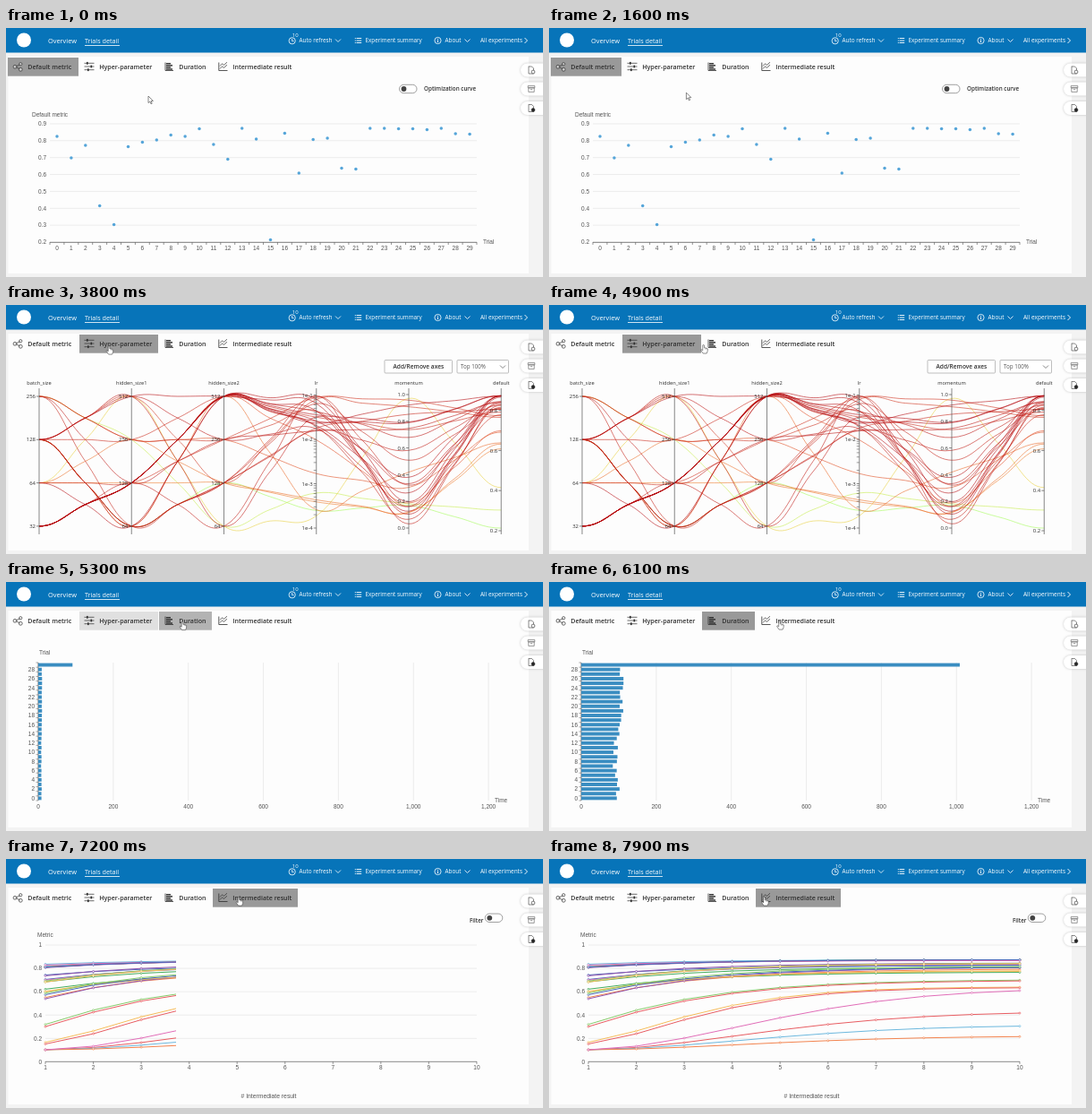
An HTML page with a canvas that plays this animation: 600x278 px, repeating every 8 s.

```html
<!DOCTYPE html>
<html lang="en">
<head>
<meta charset="utf-8">
<title>Trials detail</title>
<style>
html, body { margin: 0; width: 100%; height: 100%; overflow: hidden; background: #f3f3f3; }
canvas { display: block; width: 600px; height: 278px; }
</style>
</head>
<body>
<canvas id="stage"></canvas>
<script>
const LOOP = 8000, W = 600, H = 278;
const canvas = document.getElementById('stage');
const c = canvas.getContext('2d');
const ratio = window.devicePixelRatio || 1;
canvas.width = W * ratio;
canvas.height = H * ratio;

const UI = '"Open Sans", "Noto Sans", sans-serif';
const PLOT = '"Liberation Sans", Arial, sans-serif';
const INK = '#2f2f2f', AXIS = '#6b6b6b', GRID = '#e7e7e7';
const range = n => Array.from({ length: n }, (_, i) => i);
const clamp = v => Math.max(0, Math.min(1, v));
const mix = (a, b, p) => a + (b - a) * p;
const rand = (i, salt) => {
  const v = Math.sin(i * 12.9898 + salt * 78.233) * 43758.5453;
  return v - Math.floor(v);
};

// ---- drawing helpers ----
function text(s, x, y, size, { color = INK, align = 'left', weight = 400, font = UI } = {}) {
  c.font = `${weight} ${size}px ${font}`;
  c.fillStyle = color;
  c.textAlign = align;
  c.fillText(s, x, y + size * 0.36);
}
const label = (s, x, y, align = 'center', size = 6.5) =>
  text(s, x, y, size, { color: '#555', align, font: PLOT });

function path(points, color, width = 1, fill) {
  c.beginPath();
  points.forEach(([x, y], i) => i ? c.lineTo(x, y) : c.moveTo(x, y));
  if (fill) { c.closePath(); c.fillStyle = fill; c.fill(); }
  c.strokeStyle = color;
  c.lineWidth = width;
  c.stroke();
}
const line = (x1, y1, x2, y2, color, width = 1) => path([[x1, y1], [x2, y2]], color, width);

function rect(x, y, w, h, color) {
  c.fillStyle = color;
  c.fillRect(x, y, w, h);
}
function paint(fill, stroke, width) {
  if (fill) { c.fillStyle = fill; c.fill(); }
  if (stroke) { c.strokeStyle = stroke; c.lineWidth = width; c.stroke(); }
}
function circle(x, y, r, fill, stroke, width = 0.8) {
  c.beginPath();
  c.arc(x, y, r, 0, Math.PI * 2);
  paint(fill, stroke, width);
}
function box(x, y, w, h, r, fill, stroke, width = 0.8) {
  c.beginPath();
  c.roundRect(x, y, w, h, r);
  paint(fill, stroke, width);
}
const chevron = (x, y, color) => path([[x - 3, y - 1.5], [x, y + 1.5], [x + 3, y - 1.5]], color, 0.8);

function toggle(x, y) {
  box(x, y - 4.7, 19.5, 9.4, 4.7, '#fff', '#777', 0.7);
  circle(x + 5, y, 2.9, '#444');
}

// ---- page frame ----
function header() {
  const white = { color: '#fff' };
  rect(0, 0, W, 27.5, '#0774b9');
  circle(20, 13.5, 8, '#fff');
  text('Overview', 47, 14.5, 7.4, white);
  text('Trials detail', 88, 14.5, 7.2, white);
  line(88, 19.5, 127, 19.5, '#fff', 0.8);

  circle(319.7, 14.3, 3.6, null, '#fff');
  path([[319.7, 12], [319.7, 14.6], [321.6, 14.6]], '#fff', 0.8);
  text('10', 319.8, 7.6, 6, white);
  text('Auto refresh', 327.5, 14, 6.4, white);
  chevron(371, 14, '#fff');

  for (const y of [11.5, 14, 16.5]) {
    rect(389.8, y - 0.4, 1, 0.9, '#fff');
    rect(391.6, y - 0.4, 5.6, 0.9, '#fff');
  }
  text('Experiment summary', 401.5, 14, 6.3, white);

  circle(482.5, 14, 3.6, null, '#fff');
  rect(482.1, 13.4, 0.9, 2.7, '#fff');
  rect(482.1, 11.8, 0.9, 0.9, '#fff');
  text('About', 490.5, 14, 6.4, white);
  chevron(515.5, 14, '#fff');
  text('All experiments', 530, 14, 6.5, white);
  path([[579.5, 11], [582.5, 14], [579.5, 17]], '#fff', 0.9);
}

function sideButtons() {
  [47, 68, 89.5].forEach((y, i) => {
    c.save();
    c.shadowColor = 'rgba(0,0,0,.22)';
    c.shadowBlur = 3 * ratio;
    box(575, y - 7.5, 32, 15, 7.5, '#fff');
    c.restore();
    if (i === 1) {
      box(583.2, y - 3.4, 7.6, 2.2, 0, null, '#555', 0.6);
      box(583.8, y - 1.2, 6.4, 4.6, 0, null, '#555', 0.6);
      line(585.8, y + 0.7, 588.2, y + 0.7, '#555', 0.6);
    } else {
      path([[584, y - 4], [587.5, y - 4], [589.5, y - 2], [589.5, y + 4], [584, y + 4], [584, y - 4.3]], '#555', 0.7);
      circle(589, y + 2, 1.9, i ? '#222' : '#fff', '#444', 0.7);
    }
  });
}

// ---- tabs: each fades in when pressed and out at the next press ----
const icons = [
  () => {
    path([[16, 40.5], [10.5, 43.3], [16, 46.2]], INK, 0.7);
    circle(10, 43.3, 1.9, '#fff8', INK, 0.7);
    circle(16.3, 40.2, 1.6, '#fff8', INK, 0.7);
    circle(16.3, 46.3, 1.9, '#fff8', INK, 0.7);
  },
  () => range(3).forEach(i => {
    const y = 39.3 + i * 3.7;
    line(87.5, y, 98.5, y, INK, 0.7);
    rect([90, 94.5, 91][i], y - 1.4, 1.6, 2.8, INK);
  }),
  () => {
    path([[178, 38.5], [178, 47.5], [187, 47.5]], INK, 0.8);
    range(4).forEach(i => rect(179, 39 + i * 2.1, 5 + (i % 2) * 2, 1.4, INK));
  },
  () => {
    path([[237.8, 38.5], [237.8, 47.5], [247.5, 47.5]], INK, 0.8);
    for (const y of [0, 3]) path([[239, 42.5 + y], [241.5, 39.8 + y], [243.5, 41.4 + y], [247, 38.2 + y]], INK, 0.7);
  }
];
const tabs = [
  { name: 'Default metric', x: 2, w: 79, on: -1000, hover: -1000 },
  { name: 'Hyper-parameter', x: 82, w: 88, on: 3460, hover: 2150 },
  { name: 'Duration', x: 171, w: 59, on: 5230, hover: 4950 },
  { name: 'Intermediate result', x: 231, w: 95, on: 6860, hover: 6110 }
];

function tabBar(t) {
  tabs.forEach((tab, i) => {
    const next = tabs[i + 1] ? tabs[i + 1].on : LOOP;
    const on = clamp((t - tab.on) / 100), off = clamp((t - next) / 100);
    const idle = t > tab.hover ? 241 : 253;
    const g = Math.round(off ? mix(153, 253, off) : mix(idle, 153, on));
    if (g < 253) rect(tab.x, 33, tab.w, 20.7, `rgb(${g},${g},${g})`);
    icons[i]();
    text(tab.name, tab.x + 22.3, 43.3, 7.05, { weight: 600 });
  });
}

// ---- trials: final score of each run, in thousandths ----
const score = [826, 698, 773, 415, 303, 765, 791, 805, 834, 826, 871, 778, 691, 873, 810,
  213, 844, 608, 807, 815, 638, 632, 873, 873, 871, 871, 866, 873, 842, 839].map(v => v / 1000);
const trials = range(score.length);

function defaultMetric() {
  text('Optimization curve', 467, 68, 6.3, { weight: 600 });
  toggle(439.5, 68);
  label('Default metric', 29, 97, 'left');
  range(8).forEach(i => {
    const y = 239 - i * 18.86;
    if (i) line(49, y, 526, y, GRID, 0.8);
    label((0.2 + i / 10).toFixed(1), 45, y, 'right');
  });
  line(49, 239.3, 526, 239.3, AXIS, 0.9);
  range(31).forEach(i => line(49 + i * 15.9, 239, 49 + i * 15.9, 242, AXIS, 0.7));
  trials.forEach(i => {
    const x = 57 + i * 15.9;
    label(i, x, 245.8);
    circle(x, 239 - (score[i] - 0.2) * 188.6, 1.75, '#55a5d9');
  });
  label('Trial', 533, 239, 'left');
}

// ---- parallel axes: good runs share settings and high learning rates ----
const axisX = i => 37 + i * 103.25;
const parallel = trials.map(i => {
  const v = score[i], weak = clamp((0.76 - v) / 0.14);
  const shared = v > 0.84 && rand(i, 1) < 0.65;
  const level = k => shared ? [0, 1, 3][k] : Math.floor(4 * rand(i, k + 2));
  return [
    ...range(3).map(k => 246.9 - 48.3 * level(k)),
    101 + 40 * rand(i, 5) ** 1.3 + weak * 104,
    101 + 147 * rand(i, 6),
    252 - (v - 0.2) * 224
  ];
});
const byScore = [...trials].sort((a, b) => score[a] - score[b]);
const ramp = [[164, 252, 90], [228, 225, 70], [250, 160, 55], [222, 70, 35], [182, 14, 20]];

function heat(v) {
  const p = clamp((v - 0.21) / 0.665) * 3.999, i = Math.floor(p);
  return `rgba(${ramp[i].map((a, k) => Math.round(mix(a, ramp[i + 1][k], p - i)))},.74)`;
}

// Passes through every axis and every halfway point, bending only near the axes.
function smooth(ys, color) {
  const pts = range(11).map(i => [axisX(i / 2), (ys[Math.floor(i / 2)] + ys[Math.ceil(i / 2)]) / 2]);
  const slope = i => i % 10 ? (pts[i + 1][1] - pts[i - 1][1]) * 0.2 : 0;
  c.beginPath();
  c.moveTo(...pts[0]);
  range(10).forEach(i => {
    const [x, y] = pts[i], [nx, ny] = pts[i + 1];
    c.bezierCurveTo(x + 20.6, y + slope(i), nx - 20.6, ny - slope(i + 1), nx, ny);
  });
  c.strokeStyle = color;
  c.lineWidth = 0.8;
  c.stroke();
}

const powers = (top, n) => range(n).map(i => top / 2 ** i);
const axes = [
  { name: 'batch_size', marks: powers(256, 4), top: 102, step: 48.3 },
  { name: 'hidden_size1', marks: powers(512, 4), top: 102, step: 48.3 },
  { name: 'hidden_size2', marks: powers(512, 4), top: 102, step: 48.3 },
  { name: 'lr', marks: range(4).map(i => `1e-${i + 1}`), top: 100.5, step: 49.5 },
  { name: 'momentum', marks: range(6).map(i => (1 - i / 5).toFixed(1)), top: 100, step: 29.8 },
  { name: 'default', marks: range(4).map(i => (0.8 - i / 5).toFixed(1)), top: 117.6, step: 44.8 }
];

function hyperParameter() {
  box(423, 61.5, 75.5, 14.5, 1, '#fff', '#a3a3a3', 0.7);
  text('Add/Remove axes', 460.8, 68.8, 6.6, { weight: 600, align: 'center' });
  box(504, 61.5, 57.5, 14.5, 1, '#fff', '#a3a3a3', 0.7);
  text('Top 100%', 508, 68.8, 6.2, { color: '#555' });
  chevron(555, 69, '#666');

  byScore.forEach(i => smooth(parallel[i], heat(score[i])));
  axes.forEach(({ name, marks, top, step }, i) => {
    const x = axisX(i);
    line(x, 93, x, 256, '#555', 0.7);
    text(name, x, 87.3, 5.7, { align: 'center' });
    marks.forEach((s, k) => {
      const y = top + k * step;
      line(x - 3, y, x, y, '#555', 0.7);
      text(s, x - 4, y, 6, { align: 'right' });
      if (name === 'lr' && k < 3) range(8).forEach(n => {
        const my = y - step * Math.log10((n + 2) / 10);
        line(x - 3, my, x, my, '#555', 0.6);
      });
    });
  });
}

// ---- duration bars ----
const barLength = i => i === 29 ? 425 : 42 + 4 * Math.sin((i - 16) / 5) + 6 * (rand(i, 7) - 0.5);

function duration(t) {
  const grow = 1 - (1 - clamp((t - 5270) / 1000)) ** 3;
  label('Trial', 37, 79, 'left');
  range(7).forEach(i => {
    const x = 36 + i * 83.85;
    if (i) line(x, 90, x, 244, GRID, 0.8);
    label((i * 200).toLocaleString('en-US'), x, 250.7);
  });
  line(36, 90, 36, 244, AXIS, 0.9);
  range(31).forEach(i => line(33.5, 244 - i * 5.133, 36, 244 - i * 5.133, AXIS, 0.6));
  trials.forEach(i => {
    const y = 241.4 - i * 5.133;
    if (i % 2 === 0) label(i, 32, y, 'right');
    rect(36, y - 1.95, barLength(i) * grow, 3.9, '#3a8dc1');
  });
  label('Time', 546, 244, 'left');
}

// ---- intermediate results: weak runs start low and learn late ----
const palette = ['#4a67bb', '#86cb6b', '#f6bd5b', '#e85d62', '#6cb8de', '#45ad5d', '#f3844f', '#9357ae', '#e16db8'];
const stepX = i => 44 + i * 53.55;

const curves = trials.map(n => {
  const v = score[n], end = 226 - 130 * v;
  const weak = clamp((0.89 - v) / 0.28), late = weak ** 6;
  const spread = v > 0.75 ? 0.4 + 1.2 * rand(n, 8) : 1;
  const gap = (213 - end) * weak ** 1.2 * spread + (v > 0.75 ? 3 : 0);
  const learn = i => 1 - Math.exp(-mix(0.42, 0.06, late) * i ** mix(1, 1.8, late));
  return range(10).map(i => [stepX(i), end + gap * (1 - learn(i) / learn(9))]);
});

function intermediate(t) {
  text('Filter', 518, 69, 6.2, { weight: 600 });
  toggle(535.3, 65.8);
  label('Metric', 35, 85, 'left');
  range(6).forEach(i => {
    const y = 226.3 - i * 26.05;
    if (i) line(44, y, 526, y, GRID, 0.8);
    label(i / 5, 40, y, 'right');
  });
  line(44, 226.3, 526, 226.3, AXIS, 0.8);
  range(10).forEach(i => {
    line(stepX(i), 226, stepX(i), 229, AXIS, 0.7);
    label(i + 1, stepX(i), 233);
  });
  label('# Intermediate result', 293.5, 265, 'center', 6.8);

  const p = clamp((t - 6900) / 1000);
  c.save();
  c.beginPath();
  c.rect(41, 80, 3 + 485 * p, 150);
  c.clip();
  curves.forEach((pts, n) => {
    const color = palette[n % palette.length];
    path(pts, color, 1);
    for (const [x, y] of pts) circle(x, y, 1, '#fff', color, 0.7);
  });
  c.restore();
}

// ---- pointer: start, end and destination of each move ----
const moves = [
  [1400, 2300, 115, 45.5],
  [4550, 5100, 197, 44],
  [5600, 6080, 257.5, 43.5],
  [6850, 7150, 260, 42.5],
  [7300, 7800, 240.5, 42.5]
];

function pointer(t) {
  let x = 159, y = 76;
  for (const [from, to, mx, my] of moves) {
    const u = clamp((t - from) / (to - from)), e = u * u * (3 - 2 * u);
    x = mix(x, mx, e);
    y = mix(y, my, e);
  }
  c.save();
  c.translate(x, y);
  c.lineJoin = 'round';
  if (y > 54) {
    path([[0, 0], [0, 7.6], [1.8, 6], [3, 8.8], [4.2, 8.2], [3, 5.6], [5.4, 5.4], [0, 0]], '#555', 0.7, '#fff');
  } else {
    path([[-0.8, 0.4], [0, 0], [0.8, 0.4], [0.9, 3.3], [3.5, 3.8], [4.7, 4.5], [4.6, 7],
      [3.6, 9.6], [-0.4, 9.6], [-2.8, 6.2], [-2.4, 5.2], [-0.8, 6.2], [-0.8, 0.4]], '#444', 0.6, '#fff');
    for (const fx of [2.2, 3.5]) line(fx, 3.8, fx, 5.2, '#555', 0.4);
  }
  c.restore();
}

function draw(t) {
  c.setTransform(ratio, 0, 0, ratio, 0, 0);
  rect(0, 0, W, H, '#f3f3f3');
  rect(2.5, 32, 581.5, 242, '#fdfdfd');
  header();
  tabBar(t);
  if (t < 3500) defaultMetric();
  else if (t < 5270) hyperParameter();
  else if (t < 6900) duration(t);
  else intermediate(t);
  sideButtons();
  pointer(t);
}

const begin = performance.now();
function tick() {
  draw((performance.now() - begin) % LOOP);
  requestAnimationFrame(tick);
}
tick();
</script>
</body>
</html>
```
